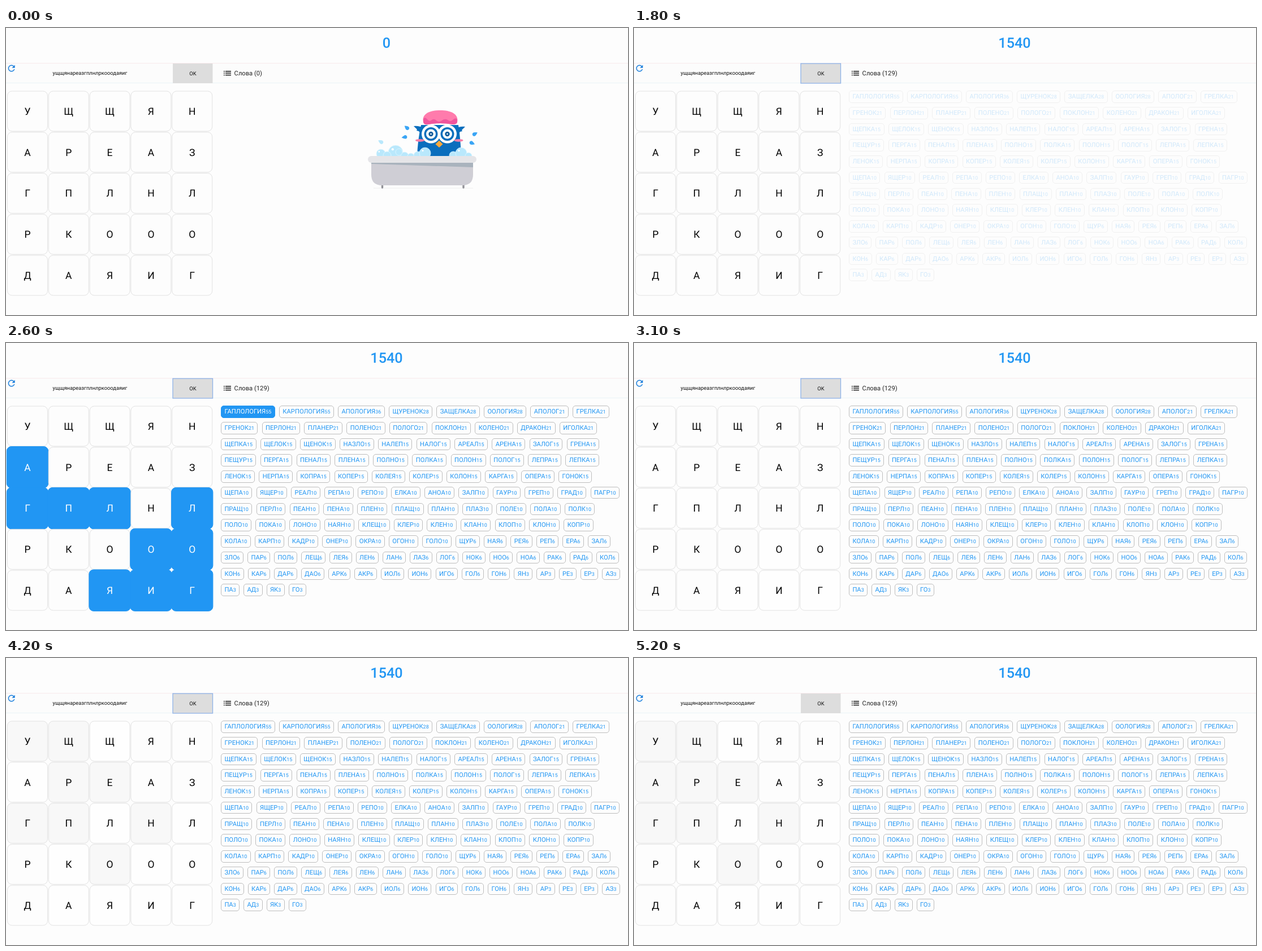
These frames come from a looping animation (1100x509 px, 5.3 s). An HTML page:

```html
<!DOCTYPE html>
<html lang="ru">
<head>
<meta charset="utf-8">
<title>Слова</title>
<style>
html, body { margin: 0; width: 100%; height: 100%; overflow: hidden; background: #fdfdfd; }
body { position: relative; font-family: Roboto, sans-serif; text-rendering: geometricPrecision; }
svg { position: absolute; left: 0; top: 0; }
.row { position: absolute; left: 380px; display: flex; justify-content: space-between; }
.chip {
  box-sizing: border-box; height: 21.6px; padding: 0 5.4px; border: 1px solid #bdbdbd; border-radius: 5px;
  font-size: 11.2px; line-height: 20px; color: #2196f3; white-space: nowrap;
}
.chip small { font-size: 8.96px; }
.chip.on { background: #2196f3; border-color: #2196f3; color: #fff; }
</style>
</head>
<body>
<svg width="1100" height="509" viewBox="0 0 1100 509" font-family="Roboto, sans-serif">
  <rect y="63" width="1100" height="34" fill="#fcfcfc"/>
  <path d="M0 62.5H1100" stroke="#f8e9eb"/>
  <path d="M0 97.5H1100" stroke="#eaf3f6"/>
  <text id="score" x="673" y="34.6" font-size="25.2" font-weight="500" fill="#2196f3" text-anchor="middle">0</text>
  <path transform="translate(.7 62.5) scale(.75)" fill="#1e80dc" d="M17.65 6.35C16.2 4.9 14.21 4 12 4c-4.42 0-7.99 3.58-7.99 8s3.57 8 7.99 8c3.73 0 6.84-2.55 7.73-6h-2.08c-.82 2.33-3.04 4-5.65 4-3.31 0-6-2.69-6-6s2.69-6 6-6c1.66 0 3.14.69 4.22 1.78L13 11h7V4l-2.35 2.35z"/>
  <text x="148.5" y="83.4" font-size="9.33" fill="#111" text-anchor="middle">ущщянареазгплнлркооодаяиг</text>
  <rect id="btn" x="295" y="63" width="70.5" height="35" fill="#ddd"/>
  <rect id="focus" x="295" y="63" width="70.5" height="35" fill="none" stroke="#8fb3e8" stroke-width="1.3"/>
  <text id="ok" x="330.4" y="83.8" font-size="9.33" text-anchor="middle">OK</text>
  <path d="M385 76.7h1.7m1.3 0h10M385 80.1h1.7m1.3 0h10M385 83.5h1.7m1.3 0h10" stroke="#111" stroke-width="1.5"/>
  <text id="head" x="403.6" y="84" font-size="11.2" fill="#222">Слова (0)</text>
  <g id="grid" font-size="17.5" text-anchor="middle"></g>

  <g id="bath">
    <path d="M650 284H826" stroke="#eee"/>
    <g fill="#0a6ebd">
      <path d="M734 172H800Q804 196 805 229H727Q728 198 734 172Z"/>
      <path d="M721 174Q731 173 739 178L736 189Q732 186 730 183L726 182Q728 180 725 178Z"/>
      <path d="M812 175Q802 174 794 179L797 190Q801 187 803 184L807 183Q805 181 808 179Z"/>
    </g>
    <g id="eyes"></g>
    <path d="M766 199.5L772.5 206 766 212 759.5 206Z" fill="#fba93a"/>
    <ellipse cx="732" cy="199.3" rx="8" ry="2.4" fill="#f77fa9"/>
    <ellipse cx="800.5" cy="199.3" rx="8" ry="2.4" fill="#f77fa9"/>
    <path d="M738 167C735 153 748 146 768 146S801 153 798 167Q797 171 790 171Q768 167 746 171Q739 172 738 167Z" fill="#ff7bac"/>
    <path d="M738 161Q742 157 745 162Q749 167 753 163Q757 160 761 164Q766 168 771 164Q776 160 781 163Q786 167 790 163Q795 158 798 162V167Q797 171 790 171Q768 167 746 171Q739 172 738 167Z" fill="#f0559d"/>
    <g id="drops"></g>
    <g id="foam"></g>
    <path d="M665.5 274V283M809 274V283" stroke="#929298" stroke-width="3.4" stroke-linecap="round"/>
    <path d="M646 237H826V260Q826 279 807 279H665Q646 279 646 260Z" fill="#cfced5"/>
    <path d="M646 238H826V247L646 241Z" fill="#a9b3bd"/>
    <rect x="640" y="227" width="192" height="12" rx="6" fill="#e5e5e8"/>
  </g>

  <g id="load" fill="none" stroke="#2196f3" stroke-width="2.8">
    <circle cx="738" cy="212.5"/><circle cx="738" cy="212.5"/>
  </g>
</svg>
<div id="words"></div>

<script>
const $ = id => document.getElementById(id);
const LOOP = 5300, BLUE = '#2196f3';

function add(parent, tag, attrs, text = '') {
  const el = document.createElementNS('http://www.w3.org/2000/svg', tag);
  set(el, attrs);
  el.textContent = text;
  parent.appendChild(el);
  return el;
}
function set(el, attrs) {
  for (const k in attrs) el.setAttribute(k, attrs[k]);
}
const disc = (parent, cx, cy, r, fill, more) => add(parent, 'circle', { cx, cy, r, fill, ...more });

// Bathing bird details
for (const x of [751.5, 780.5]) {
  [[16.5, '#fff'], [12, '#0a6ebd'], [8.5, '#fff'], [4.2, '#0a5c9c'], [1.3, '#fff']]
    .forEach(([r, fill]) => disc($('eyes'), x, 188, r, fill));
}
[[709, 177, -50, '#3aa5f5'], [705, 193.5, -100, '#3aa5f5'], [829, 188, 60, '#3aa5f5'],
 [824, 204, 115, '#3aa5f5'], [663, 202, -60, '#b9e8fc']].forEach(([x, y, a, fill]) =>
  add($('drops'), 'path', { d: 'M0-5.5Q4 0 3.2 2.2A3.4 3.4 0 0 1-3.2 2.2Q-4 0 0-5.5Z', fill,
    transform: `translate(${x} ${y}) rotate(${a})` }));
[[663, 223, 8], [689, 221, 13], [674, 226, 7], [705, 227, 7], [716, 228, 6], [728, 226, 7],
 [741, 222, 10], [791, 226, 7], [805, 222, 10], [818, 227, 6], [695, 220, 6]].forEach(([x, y, r]) => {
  disc($('foam'), x, y, r, '#b9e8fc', { stroke: '#e2f6fe', 'stroke-width': .8 });
  if (r > 7) disc($('foam'), x - r * .4, y - r * .45, r * .16, '#fff');
});

// Letter grid
const cells = {};
['УЩЩЯН', 'АРЕАЗ', 'ГПЛНЛ', 'РКООО', 'ДАЯИГ'].forEach((line, r) => [...line].forEach((ch, c) => {
  const x = 2.5 + c * 72.8, y = 112 + r * 72.8;
  cells[`${r}${c}`] = {
    x, y,
    box: add($('grid'), 'rect', { rx: 8 }),
    label: add($('grid'), 'text', { x: x + 35.5, y: y + 41.8 }, ch)
  };
}));

// Word list: right edge of each row, then its words
const chips = {};
[[1067, 'ГАПЛОЛОГИЯ КАРПОЛОГИЯ АПОЛОГИЯ ЩУРЕНОК ЗАЩЕЛКА ООЛОГИЯ АПОЛОГ ГРЕЛКА'],
 [1045.5, 'ГРЕНОК ПЕРЛОН ПЛАНЕР ПОЛЕНО ПОЛОГО ПОКЛОН КОЛЕНО ДРАКОН ИГОЛКА'],
 [1049.5, 'ЩЕПКА ЩЕЛОК ЩЕНОК НАЗЛО НАЛЕП НАЛОГ АРЕАЛ АРЕНА ЗАЛОГ ГРЕНА'],
 [1049, 'ПЕЩУР ПЕРГА ПЕНАЛ ПЛЕНА ПОЛНО ПОЛКА ПОЛОН ПОЛОГ ЛЕПРА ЛЕПКА'],
 [1036.5, 'ЛЕНОК НЕРПА КОПРА КОПЕР КОЛЕЯ КОЛЕР КОЛОН КАРГА ОПЕРА ГОНОК'],
 [1085, 'ЩЕПА ЯЩЕР РЕАЛ РЕПА РЕПО ЕЛКА АНОА ЗАЛП ГАУР ГРЕП ГРАД ПАГР'],
 [1041.5, 'ПРАЩ ПЕРЛ ПЕАН ПЕНА ПЛЕН ПЛАЩ ПЛАН ПЛАЗ ПОЛЕ ПОЛА ПОЛК'],
 [1039, 'ПОЛО ПОКА ЛОНО НАЯН КЛЕЩ КЛЕР КЛЕН КЛАН КЛОП КЛОН КОПР'],
 [1069, 'КОЛА КАРП КАДР ОНЕР ОКРА ОГОН ГОЛО ЩУР НАЯ РЕЯ РЕП ЕРА ЗАЛ'],
 [1084, 'ЗЛО ПАР ПОЛ ЛЕЩ ЛЕЯ ЛЕН ЛАН ЛАЗ ЛОГ НОК НОО НОА РАК РАД КОЛ'],
 [1086, 'КОН КАР ДАР ДАО АРК АКР ИОЛ ИОН ИГО ГОЛ ГОН ЯН АР РЕ ЕР АЗ'],
 [531, 'ПА АД ЯК ГО']].forEach(([right, line], i) => {
  const row = document.createElement('div');
  row.className = 'row';
  row.style.top = 111.2 + i * 28.73 + 'px';
  row.style.width = right - 380 + 'px';
  for (const word of line.split(' ')) {
    const n = word.length, chip = chips[word] = document.createElement('div');
    chip.className = 'chip';
    chip.innerHTML = `${word}<small>${n * (n + 1) / 2}</small>`;
    row.appendChild(chip);
  }
  $('words').appendChild(row);
});

// Hovered words: start, end, word, path over the grid, fill left behind
const hovers = [
  [2600, 3100, 'ГАПЛОЛОГИЯ', '20 10 21 22 33 24 34 44 43 42', '#fefefe'],
  [3200, 3400, 'ГРЕНОК', '20 11 12 23 32 31', '#f8f8f8'],
  [3400, 3600, 'ЩЕПКА', '02 12 21 31 41', '#fefefe'],
  [3600, 4200, 'ПЕЩУР', '21 12 01 00 11', '#f8f8f8'],
  [4300, 4700, 'ПЕРГА', '21 12 11 20 10', '#f8f8f8']
];

function drawGrid(t) {
  const fills = {};
  for (const [from, to, word, path, rest] of hovers) {
    const on = t >= from && t < to;
    chips[word].classList.toggle('on', on);
    if (t >= from) path.split(' ').forEach(k => fills[k] = on ? BLUE : rest);
  }
  for (const k in cells) {
    const { x, y, box, label } = cells[k], fill = fills[k] || '#fdfdfd';
    const on = fill === BLUE, grow = on ? 1.2 : 0;
    set(box, { x: x - grow, y: y - grow, width: 71 + 2 * grow, height: 71 + 2 * grow,
      fill, stroke: on ? BLUE : '#e2e2e2' });
    set(label, { fill: on ? '#fff' : '#000' });
  }
}

function drawLoader(t) {
  $('load').style.display = t >= 1200 && t < 1800 ? '' : 'none';
  [...$('load').children].forEach((ring, i) => {
    const p = (Math.max(0, t - 1200) / 1000 + .09 + i / 2) % 1;
    set(ring, { r: 18.5 * (1 - (1 - p) ** 2.2), opacity: (1 - p) ** 1.15 });
  });
}

function draw(t) {
  const busy = t >= 1200 && t < 1700, done = t >= 1800;
  set($('btn'), { fill: busy ? '#e3e3e3' : '#ddd' });
  set($('ok'), { fill: busy ? '#666' : t >= 600 && t < 1200 ? '#222' : '#111' });
  $('focus').style.display = t >= 1200 && t < 5200 ? '' : 'none';
  $('bath').style.display = t < 1200 ? '' : 'none';
  $('score').textContent = done ? 1540 : 0;
  $('head').textContent = `Слова (${done ? 129 : 0})`;
  $('words').style.opacity = done ? Math.min(1, .2 + (t - 1800) / 500) : 0;
  drawLoader(t);
  drawGrid(t);
}

function tick() {
  draw(performance.now() % LOOP);
  requestAnimationFrame(tick);
}
tick();
</script>
</body>
</html>
```
